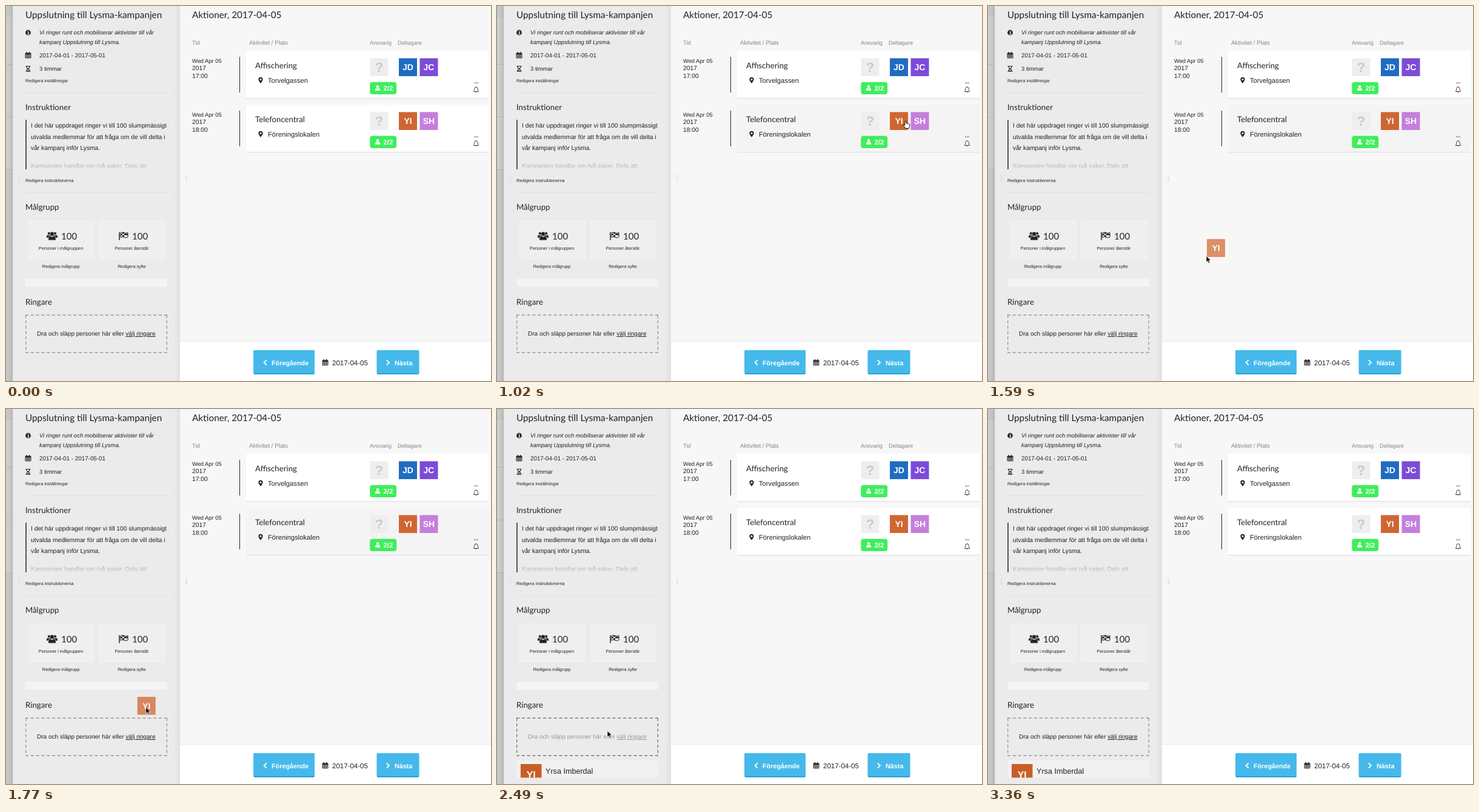
Recreate the animation shown at these times as an HTML page. Size 800 by 620 pixels, loop 3690 ms.

```html
<!DOCTYPE html>
<html lang="sv">
<head>
<meta charset="utf-8">
<title>Aktioner</title>
<style>
html, body { margin: 0; width: 100%; height: 100%; overflow: hidden; background: #f7f7f7; }
svg { display: block; width: 800px; height: 620px; }
text { font-family: "Liberation Sans", Arial, sans-serif; fill: #222; text-rendering: geometricPrecision; white-space: pre; }
.h { font-family: Lato, sans-serif; }
.b { font-weight: bold; }
.m { text-anchor: middle; }
</style>
</head>
<body>
<svg id="stage" viewBox="0 0 800 620" xmlns="http://www.w3.org/2000/svg">
  <defs>
    <linearGradient id="edge"><stop offset="0" stop-color="#000" stop-opacity="0"/><stop offset="1" stop-color="#000" stop-opacity=".09"/></linearGradient>
    <linearGradient id="fade" x2="0" y2="1"><stop offset="0" stop-color="#ebebeb" stop-opacity=".3"/><stop offset="1" stop-color="#ebebeb" stop-opacity=".85"/></linearGradient>
    <clipPath id="rowClip"><rect x="32" y="580" width="234" height="29.5"/></clipPath>
  </defs>
  <g id="page"></g>
  <g id="live">
    <g id="row" clip-path="url(#rowClip)"></g>
    <g id="ghost"></g>
    <path id="arrow" d="M0 0V10.6L2.5 8.3L4.2 12.2L6 11.4L4.3 7.6H7.7Z" fill="#000" stroke="#fff" stroke-width=".8"/>
    <path id="hand" d="M-1.2 .9Q0-.6 1.2 .9V4.3Q2.5 3.6 3.3 4.6Q4.6 4 5.3 5.1Q7 4.8 7 6.6Q7 9.4 5.7 10.7V12.4H-.9V11Q-2.6 9.2-4.2 6.9Q-3.5 5.2-1.2 7.4Z" fill="#fff" stroke="#111" stroke-width="1"/>
  </g>
</svg>
<script>
const LOOP = 3690;
const $ = id => document.getElementById(id);
const rect = (x, y, w, h, fill, extra = '') =>
  `<rect x="${x}" y="${y}" width="${w}" height="${h}" fill="${fill}" ${extra}/>`;
const text = (x, y, size, s, cls = '', extra = '') =>
  `<text x="${x}" y="${y}" font-size="${size}" class="${cls}" ${extra}>${s}</text>`;
const path = (d, extra = 'fill="#222"') => `<path d="${d}" ${extra}/>`;
const at = (x, y, s) => `<g transform="translate(${x} ${y})">${s}</g>`;
const WHITE = 'style="fill:#fff"';
const GREY = 'style="fill:#858585"';

const avatar = (x, y, name, fill) =>
  rect(x, y, 30, 29.6, fill) + text(x + 15, y + 19.6, 14, name, 'b m', WHITE);

const calendar = (x, y) => at(x, y,
  path('M.5 2H9.5V10H.5ZM.5 4H9.5M3.5 4V10M6.5 4V10M.5 6H9.5M.5 8H9.5', 'fill="none" stroke="#222" stroke-width=".9"') +
  path('M.5 2H9.5V4H.5ZM2 0H3.6V3H2ZM6.4 0H8V3H6.4Z'));

const person = fill => `<circle cy="-2.2" r="2.3" fill="${fill}"/>` +
  path('M-4 4V2.4Q-4 .2-1.8 .2Q0 1.4 1.8 .2Q4 .2 4 2.4V4Q4 4.5 3.4 4.5H-3.4Q-4 4.5-4 4Z', `fill="${fill}"`);

const pin = path('M0 10Q-3.6 5-3.6 3.4A3.6 3.6 0 0 1 3.6 3.4Q3.6 5 0 10ZM0 1.8A1.6 1.6 0 0 0 0 5A1.6 1.6 0 0 0 0 1.8Z',
  'fill="#222" fill-rule="evenodd"');

const bell = path('M-4.2 3.5Q-2.8 2.2-2.8-.8Q-2.8-4 0-4Q2.8-4 2.8-.8Q2.8 2.2 4.2 3.5ZM0-4V-5M-1.1 4Q0 5.6 1.1 4',
  'fill="none" stroke="#333" stroke-width=".9"');

function handle(x) {
  let s = '';
  for (let i = 0; i < 3; i++) s += rect(x - 1.5, 280 + i * 4, 3, 2, '#dcdcdc');
  return s;
}

function stat(x, label, link, icon) {
  return rect(x, 355, 108, 63, '#efefef', 'stroke="#f3f3f3" stroke-width="1"') + icon +
    text(x + 54, 385.5, 15, '100', 'h') +
    text(x + 53.5, 402.5, 7.25, label, 'm') + text(x + 53.5, 433, 7.25, link, 'm');
}

function action(y, id, time, title, place, people) {
  let s = rect(396, 75, 400, 78.5, '#e3e3e3', 'rx="1"') + rect(396, 74, 400, 78, '#fff', `id="${id}" rx="1"`) +
    text(307, 93.5, 9.35, 'Wed Apr 05') + text(307, 106, 10.3, '2017') + text(307, 118.5, 10.3, time) +
    rect(385, 84, 1, 59, '#222') + text(411, 103.2, 13.2, title, 'h') +
    at(420, 118, pin) + text(432, 127, 11.2, place) +
    rect(600.5, 86.4, 30, 29.6, '#eee') + text(615.5, 109, 22, '?', 'b m', 'style="fill:#c9c9c9"') +
    rect(600.3, 125.7, 43.8, 20.3, '#3fee5c', 'rx="4"') + at(613, 135.6, person('#fff')) +
    text(622.5, 139.5, 11.3, '2/2', 'b', WHITE) + at(775.5, 138, bell);
  for (let i = -1; i < 2; i++) s += `<circle cx="${775.5 + i * 2.4}" cy="127.3" r="1" fill="#dd6a64"/>`;
  people.forEach(([name, fill], i) => s += avatar(648 + i * 34.5, 86.4, name, fill));
  return at(0, y, s);
}

function button(x, w, label, tx, chevron) {
  return rect(x, 569, w, 40, '#1f9fd8', 'rx="2"') + rect(x, 569, w, 38.3, '#45b9eb', 'rx="2"') +
    path(chevron, 'fill="none" stroke="#fff" stroke-width="1.9"') + text(tx, 593.6, 10.8, label, 'b', WHITE);
}

function strip() {
  let s = rect(0, 0, 11.5, 620, '#c7c7c7');
  [17, 97, 184].forEach(y => s += rect(0, y, 11.5, y === 17 ? 79 : 86, '#cdcdcd') + rect(0, y - 1, 11.5, 1, '#b9b9b9'));
  return s + rect(0, 270, 11.5, 1, '#b9b9b9') + rect(4, 0, 7.5, 620, 'url(#edge)');
}

const group = (x, y, k) => at(x, y, `<g transform="scale(${k})" stroke="#efefef" stroke-width=".4">${person('#222')}</g>`);
const users = group(71, 378.4, 1.05) + group(81, 378.4, 1.05) + group(76, 380.2, 1.55);
const flag = path('M187 374V387', 'stroke="#222" stroke-width="1.5"') +
  path('M189 375Q192 373 195 375Q198 376.5 201 374.5V382Q198 384 195 382.5Q192 380.5 189 382.5Z', 'fill="none" stroke="#222"') +
  path('M192 374.3H195V376.5H192ZM195 376.5H198V379H195ZM189 376.5H192V379H189ZM192 379H195V381.5H192ZM198 376.5H201V379H198Z');

function left() {
  let s = strip() + rect(11.5, 0, 276, 620, '#ebebeb') + rect(276, 0, 11.5, 620, 'url(#edge)', 'opacity=".5"');
  s += text(32, 20, 15.3, 'Uppslutning till Lysma-kampanjen', 'h');
  s += '<circle cx="36.5" cy="44" r="4.4" fill="#222"/>' +
    path('M35.4 43.3H37.2V46.6M35.2 46.6H38.2M36 41.3H37.2', 'stroke="#eee" stroke-width="1.2" fill="none"');
  s += text(55, 47, 9.5, 'Vi ringer runt och mobiliserar aktivister till vår', '', 'font-style="italic"') +
    text(55, 62.5, 9.5, 'kampanj Uppslutning till Lysma.', '', 'font-style="italic"');
  s += calendar(31.5, 76) + text(55, 84.7, 9.8, '2017-04-01 - 2017-05-01');
  s += path('M32.5 99.5H40.5M32.5 108H40.5M33.8 99.5Q33.8 102.5 36.5 103.7Q39.2 102.5 39.2 99.5M33.8 108Q33.8 105 36.5 103.7Q39.2 105 39.2 108',
    'fill="none" stroke="#222" stroke-width="1.1"') + path('M34.5 108Q36.5 104.5 38.5 108Z');
  s += text(55, 107.4, 9.5, '3 timmar') + text(32, 125.7, 7.25, 'Redigera inställningar');
  s += rect(32, 143, 234, 1, '#e0e0e0') + text(32, 172, 13.2, 'Instruktioner', 'h');
  s += rect(32, 188, 2, 82, '#555');
  ['I det här uppdraget ringer vi till 100 slumpmässigt', 'utvalda medlemmar för att fråga om de vill delta i',
    'vår kampanj inför Lysma.'].forEach((l, i) => s += text(41, 201 + i * 18.6, 10.25, l));
  s += text(41, 268, 10.25, 'Kampanjen handlar om två saker. Dels att', '', 'opacity=".75"') +
    rect(35, 255, 231, 14, 'url(#fade)') + rect(35, 268, 231, 5, '#ebebeb');
  s += text(32, 291, 7.3, 'Redigera instruktionerna') + rect(32, 308, 234, 1, '#e0e0e0') + text(32, 337, 13.2, 'Målgrupp', 'h');
  s += stat(37, 'Personer i målgruppen', 'Redigera målgrupp', users) + stat(154, 'Personer återstår', 'Redigera syfte', flag);
  s += rect(32.5, 451, 233, 13, '#f4f4f4') + text(32, 493.7, 13.3, 'Ringare', 'h');
  s += path('M32 511H266M32 573H266M32.7 511V573M265.3 511V573',
    'id="zone" fill="none" stroke-width="1.4" stroke-dasharray="5 3.8"');
  s += text(51, 545, 10.06, 'Dra och släpp personer här eller <tspan text-decoration="underline">välj ringare</tspan>', '', 'id="hint"');
  return s + handle(22);
}

function right() {
  let s = rect(287, 0, 513, 620, '#f7f7f7') + text(307, 20, 15.3, 'Aktioner, 2017-04-05', 'h');
  s += text(307, 63.5, 9.4, 'Tid', '', GREY) + text(401, 63.5, 9.75, 'Aktivitet / Plats', '', GREY) +
    text(600, 63.5, 9.25, 'Ansvarig', '', GREY) + text(646, 63.5, 9.25, 'Deltagare', '', GREY);
  s += action(0, 'card1', '17:00', 'Affischering', 'Torvelgassen', [['JD', '#1f6cc2'], ['JC', '#7d4bd8']]);
  s += action(89, 'card2', '18:00', 'Telefoncentral', 'Föreningslokalen', [['YI', '#cf6632'], ['SH', '#c47fdb']]);
  s += rect(287, 554, 513, 66, '#fff') + rect(287, 554, 513, 1, '#e8e8e8');
  s += button(408.3, 100.7, 'Föregående', 438, 'M429.8 585.3L425.6 589.5L429.8 593.7') +
    button(611.7, 69.6, 'Nästa', 641, 'M627.8 585.3L632 589.5L627.8 593.7');
  return s + calendar(521.5, 584) + text(538, 593.5, 11.5, '2017-04-05') + handle(297.5);
}

$('page').innerHTML = left() + right();
$('row').innerHTML = rect(32, 581, 234, 40, '#f1f1f1') + rect(39, 587, 34.5, 35, '#c95d26') +
  text(56.2, 609.6, 16, 'YI', 'b m', WHITE) + text(80, 603.3, 12.6, 'Yrsa Imberdal');
$('ghost').innerHTML = avatar(0, 0, 'YI', '#d26a34');

// time, x, y, velocity x, velocity y
const DRAG = [
  [1260, 674, 190, -.5, .5], [1440, 505, 321, -.84, .52],
  [1770, 231, 493, -.32, .16], [2130, 182, 532, 0, 0]
];
const clamp = v => Math.max(0, Math.min(1, v));
const ease = (t, a, b) => clamp((t - a) / (b - a));

function drag(t) {
  if (t <= 1260) return [674, 190];
  if (t >= 2130) return [182, 532];
  const i = DRAG.findIndex(k => k[0] > t), a = DRAG[i - 1], b = DRAG[i];
  const d = b[0] - a[0], u = (t - a[0]) / d, v = 1 - u;
  return [1, 2].map(n => a[n] * (1 + 2 * u) * v * v + b[n] * u * u * (3 - 2 * u) +
    d * (a[n + 2] * u * v * v - b[n + 2] * u * u * v));
}

function pointer(t) {
  if (t < 1260) {
    const p = Math.pow(1 - ease(t, 150, 660), 1.5), nudge = ease(t, 900, 1020);
    return [673 + 127 * p + nudge, 189 + 150 * p + nudge];
  }
  const out = Math.pow(ease(t, 3060, 3360), 1.5), [x, y] = drag(t);
  return [x - 194 * out, y + 58 * out];
}

const move = (id, x, y) => $(id).setAttribute('transform', `translate(${x.toFixed(2)} ${y.toFixed(2)})`);
const show = (id, on) => $(id).setAttribute('visibility', on ? 'visible' : 'hidden');

function draw(t) {
  const [x, y] = pointer(t);
  const visible = t >= 150 && t < 3360;
  const dragging = t >= 1260 && t < 2370;
  const hover = visible && t < 2370 && (dragging || y < 241);
  const over = dragging && y > 511;
  const dropped = t >= 2370;
  const back = dropped ? ease(t, 2370, 2670) : 1;

  $('card2').setAttribute('fill', hover ? '#f4f4f4' : '#fff');
  const hand = hover && !dragging;
  show('hand', visible && hand);
  show('arrow', visible && !hand);
  move('hand', x, y);
  move('arrow', x, y);

  const [gx, gy] = drag(t - 25);
  show('ghost', dragging);
  move('ghost', gx - 23.7, gy - 12);
  $('ghost').setAttribute('opacity', .7 + .06 * ease(t, 1440, 1770));

  const tone = Math.round(over ? 95 : 100 + 52 * back);
  $('zone').setAttribute('stroke', `rgb(${tone},${tone},${tone})`);
  $('hint').setAttribute('opacity', over ? 0 : back);
  show('row', dropped);
}

const start = performance.now();
function tick() {
  draw((performance.now() - start) % LOOP);
  requestAnimationFrame(tick);
}
tick();
</script>
</body>
</html>
```
